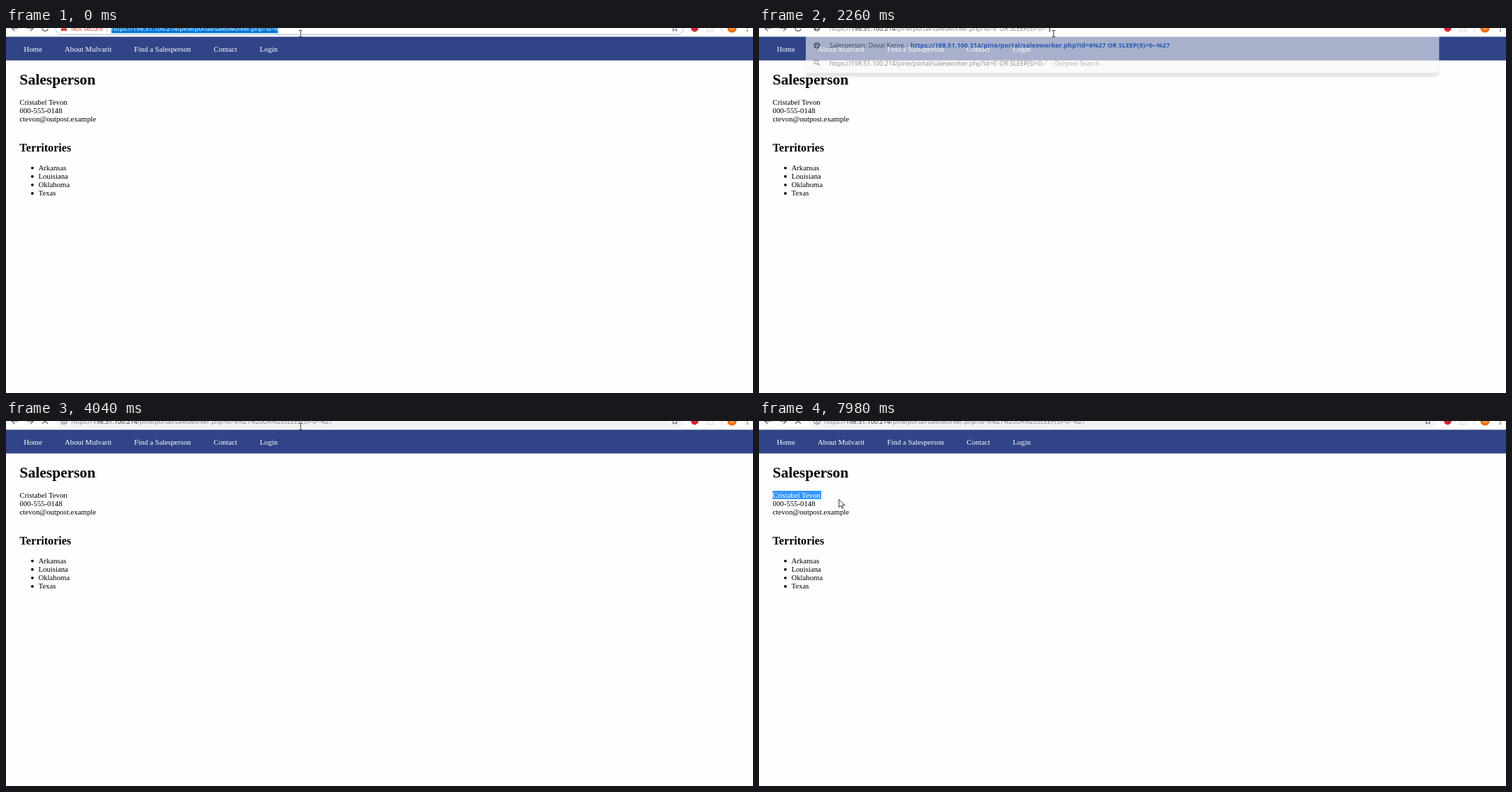
These frames come from a looping animation (1070 px wide and 523 px high, 8 s). An HTML page:

```html
<!DOCTYPE html>
<html lang="en">
<head>
<meta charset="utf-8">
<title>Salesperson</title>
<style>
  html, body { margin: 0; width: 100%; height: 100%; overflow: hidden; background: #fefefe; }
  svg { display: block; width: 1070px; height: 523px; }
  text { white-space: pre; }
  .page { font: 10.78px "Liberation Serif", "Times New Roman", serif; fill: #000; }
  .nav { fill: #fff; }
  .h1 { font-size: 21.5px; font-weight: bold; }
  .h2 { font-size: 16.1px; font-weight: bold; }
  .ui { font: 9px "Open Sans", "Noto Sans", sans-serif; fill: #7b7f83; }
  .host { fill: #2b2e31; }
  .dark { fill: #3c4043; }
  .link { font-size: 9.25px; font-weight: bold; fill: #1a67d2; }
  .line { fill: none; stroke: #5f6368; stroke-width: 1.3; }
</style>
</head>
<body>
<svg viewBox="0 0 1070 523">
  <defs>
    <g id="globe">
      <circle r="4.6" fill="#5f6368"/>
      <path d="M-3.4-1.2L-.6 1.2-.4 3.5M.2-3.6L1.2-1.6-.4-.4 2.2 1.2 1.8 2.6" fill="none" stroke="#f8f8f8" stroke-width="1.1"/>
    </g>
    <filter id="blur" x="-5%" y="-50%" width="110%" height="200%"><feGaussianBlur stdDeviation="1.2"/></filter>
  </defs>

  <g class="page">
    <rect y="12" width="1070" height="34.5" fill="#304487"/>
    <g id="nav" class="nav"></g>
    <text class="h1" x="19.6" y="80.5">Salesperson</text>
    <g id="details"></g>
    <text class="h2" x="19.6" y="177">Territories</text>
    <g id="list"></g>
  </g>

  <g class="ui">
    <rect width="1070" height="12.5" fill="#fefefe"/>
    <path class="line" d="M8.2 0H17.5M12.6-4.4L8.2 0 12.6 4.4M29.8 0H39.2M34.8-4.4L39.2 0 34.8 4.4"/>
    <path id="reload" class="line" d="M59.2-3.1A4.4 4.4 0 1 0 60.2 1.2"/>
    <path id="stop" class="line" d="M52.2-3.8L59.8 3.8M59.8-3.8L52.2 3.8"/>

    <rect id="field" x="71" y="-9.5" width="899.5" height="19" rx="9.5"/>
    <path id="star" class="line" style="stroke-width:1" d="M958-4.6L959.3-1.4 962.6-1.2 960.1 1 960.9 4.3 958 2.5 955.1 4.3 955.9 1 953.4-1.2 956.7-1.4Z"/>
    <circle cx="986.5" cy="0" r="5.4" fill="#d2232a"/>
    <rect x="1003.5" y="-5" width="9.5" height="10" fill="#f6f6f6" stroke="#dcdcdc"/>
    <path d="M1024.8 0V6" stroke="#d4d6d9"/>
    <circle cx="1040" cy="0" r="6.6" fill="#ef6c00"/>
    <text x="1036.6" y="3" style="font-size:7.5px;fill:#fde0c8">M</text>
    <g fill="#5f6368"><circle cx="1062" cy="0" r="1.1"/><circle cx="1062" cy="4" r="1.1"/></g>

    <g id="idle">
      <path d="M83-5L88 4H78Z" fill="#d93025"/>
      <path d="M83-2V1.2M83 2V3.2" stroke="#fff" stroke-width="1"/>
      <text x="93.6" y="3.8" fill="#d93025">Not secure</text>
      <path d="M144.6 0V5.5" stroke="#bfc2c6"/>
      <rect id="selected" x="151" y="0" width="238.6" height="7.4" fill="#0078d7"/>
      <text id="address" x="151" y="3.8"></text>
      <path id="strike" d="M151 .7H174" stroke="#d93025" stroke-width=".9"/>
    </g>

    <g id="typing">
      <rect x="67" width="907.3" height="12.5" fill="#fdfdfd"/>
      <use href="#globe" x="83"/>
      <text id="typed" x="101" y="3.8"></text>
      <g id="popup">
        <path d="M67.5 20H974V64q0 6-6 6H73.5q-6 0-6-6Z" fill="#000" opacity=".16" filter="url(#blur)"/>
        <path d="M67 12.2H974.3V59q0 5-5 5H72q-5 0-5-5Z" fill="#f9f9f9"/>
        <use href="#globe" x="83" y="25"/>
        <text class="dark" x="101" y="28">Salesperson: Doval Kerne</text>
        <text x="210.8" y="28">-</text>
        <text id="hit" class="link" x="217" y="28"></text>
        <circle class="line" cx="82" cy="49" r="2.7" style="stroke-width:1.1"/>
        <path class="line" d="M84 51L87 54"/>
        <text id="query" class="dark" x="101" y="53.5"></text>
        <text x="418.5" y="53.5">- Dorpeel Search</text>
      </g>
    </g>

    <g id="loading">
      <circle class="line" cx="83" cy="0" r="4.3" style="stroke-width:1.1"/>
      <path class="line" d="M83-.6V2.4M83-2.6V-1.5"/>
      <text id="sent" x="93.6" y="3.8"></text>
    </g>
    <path id="caret" d="M0 0V5.8" stroke="#222" stroke-width="1"/>
  </g>

  <g id="arrow">
    <path d="M0 0V11.4L2.6 9 4.4 12.8 6.2 12 4.5 8.3H8.3Z" fill="#fff" stroke="#222" stroke-width=".9"/>
  </g>
  <g id="beam" fill="none">
    <path d="M0-4.5V4.5" stroke="#fff" stroke-width="2.6"/>
    <path d="M-2.3-4.7H-.8L0-4.2 .8-4.7H2.3M-2.3 4.7H-.8L0 4.2 .8 4.7H2.3M0-4.2V4.2" stroke="#333" stroke-width="1"/>
  </g>
</svg>
<script>
const $ = id => document.getElementById(id);
const show = (id, on) => { $(id).style.display = on ? "" : "none"; };
const put = (id, html) => { $(id).innerHTML = html; };
const label = (x, y, s) => `<text x="${x}" y="${y}">${s}</text>`;

const HOST = "198.51.100.214";
const PATH = "/pine/portal/salesworker.php?id=6";
const LOOP = 8000;

put("nav", [[25.4, "Home"], [84, "About Mulvarit"], [183.6, "Find a Salesperson"],
  [297.5, "Contact"], [363.5, "Login"]].map(([x, s]) => label(x, 34, s)).join(""));

// The selection covers the black name and repeats it in white.
const person = ["Cristabel Tevon", "000-555-0148", "ctevon@outpost.example"];
const band = 'x="19.6" y="100" height="12"';
put("details", person.map((s, i) => label(19.6, 110 + 12.13 * i, s)).join("") +
  `<rect id="mark" ${band} fill="#3297fd"/>` +
  `<clipPath id="clip"><rect id="clipBox" ${band}/></clipPath>` +
  `<g clip-path="url(#clip)" fill="#fff">${label(19.6, 110, person[0])}</g>`);

put("list", ["Arkansas", "Louisiana", "Oklahoma", "Texas"].map((s, i) => {
  const y = 203.6 + 12.13 * i;
  return `<circle cx="37.8" cy="${y - 3}" r="1.9"/>` + label(46.4, y, s);
}).join(""));

const url = (scheme, tail) => `${scheme}//<tspan class="host">${HOST}</tspan>${PATH}${tail}`;
const plainUrl = `https://${HOST}${PATH}`;
const idleUrl = url('<tspan fill="#d93025">https:</tspan>', "");
const pickedUrl = `<tspan fill="#fff">${plainUrl}</tspan>`;
put("typed", url("https:", "' OR SLEEP(5)=0--"));
put("hit", plainUrl + "%27 OR SLEEP(5)=0--%27");
put("query", plainUrl + "' OR SLEEP(5)=0--'");
put("sent", url("https:", "%27%20OR%20SLEEP(5)=0--%27"));

// Each row: start time, then the values that hold until the next row.
const phases = [[0, "picked"], [400, "idle"], [2260, "typing"], [4040, "loading"]];
const carets = [[0, 0], [400, 389.5], [830, 0], [1410, 389.5], [1970, 0],
  [2260, 416.5], [2840, 0], [3370, 416.5], [3900, 0]];
const marks = [[0, 0], [6980, 42], [7100, 69.6]];
const pointer = [
  [0, "beam", 422, 8],
  [5030, "arrow", 372, 170], [5150, "arrow", 340.5, 312],
  [5730, "arrow", 236, 272], [5850, "arrow", 120.5, 227],
  [6000, "arrow", 84, 180], [6120, "arrow", 48, 128], [6250, "beam", 32.5, 108.3],
  [6400, "arrow", 17.6, 101.3], [6830, "arrow", 20, 101.3],
  [6980, "beam", 62, 107], [7100, "arrow", 95, 104],
  [7250, "arrow", 103.5, 104], [7680, "arrow", 110.3, 108],
  [7840, "arrow", 113.3, 110.3], [7980, "arrow", 114.6, 112.3]
];
const at = (rows, t) => rows.filter(r => r[0] <= t).pop().slice(1);

let last = "";
function draw(t) {
  const [phase] = at(phases, t), [caret] = at(carets, t), [mark] = at(marks, t);
  const [shape, x, y] = at(pointer, t);
  const fade = t < 2380 ? 0.6 : 1;
  const key = [phase, caret, mark, shape, x, y, fade].join();
  if (key === last) return;
  last = key;

  const picked = phase === "picked", idle = picked || phase === "idle";
  const typing = phase === "typing", loading = phase === "loading";
  show("idle", idle);
  show("typing", typing);
  show("loading", loading);
  show("reload", !loading);
  show("stop", loading);
  show("star", !typing);
  show("selected", picked);
  show("strike", !picked);
  put("address", picked ? pickedUrl : idleUrl);
  $("field").setAttribute("fill", loading ? "#f1f3f4" : "#fff");
  $("field").setAttribute("stroke", loading ? "none" : "#a9bfe6");
  $("popup").setAttribute("opacity", fade);

  show("caret", caret);
  $("caret").setAttribute("transform", `translate(${caret} 0)`);
  $("mark").setAttribute("width", mark);
  $("clipBox").setAttribute("width", mark);

  for (const id of ["arrow", "beam"]) show(id, id === shape);
  $(shape).setAttribute("transform", `translate(${x} ${y})`);
}

const start = performance.now();
function tick() {
  draw((performance.now() - start) % LOOP);
  requestAnimationFrame(tick);
}
tick();
</script>
</body>
</html>
```
